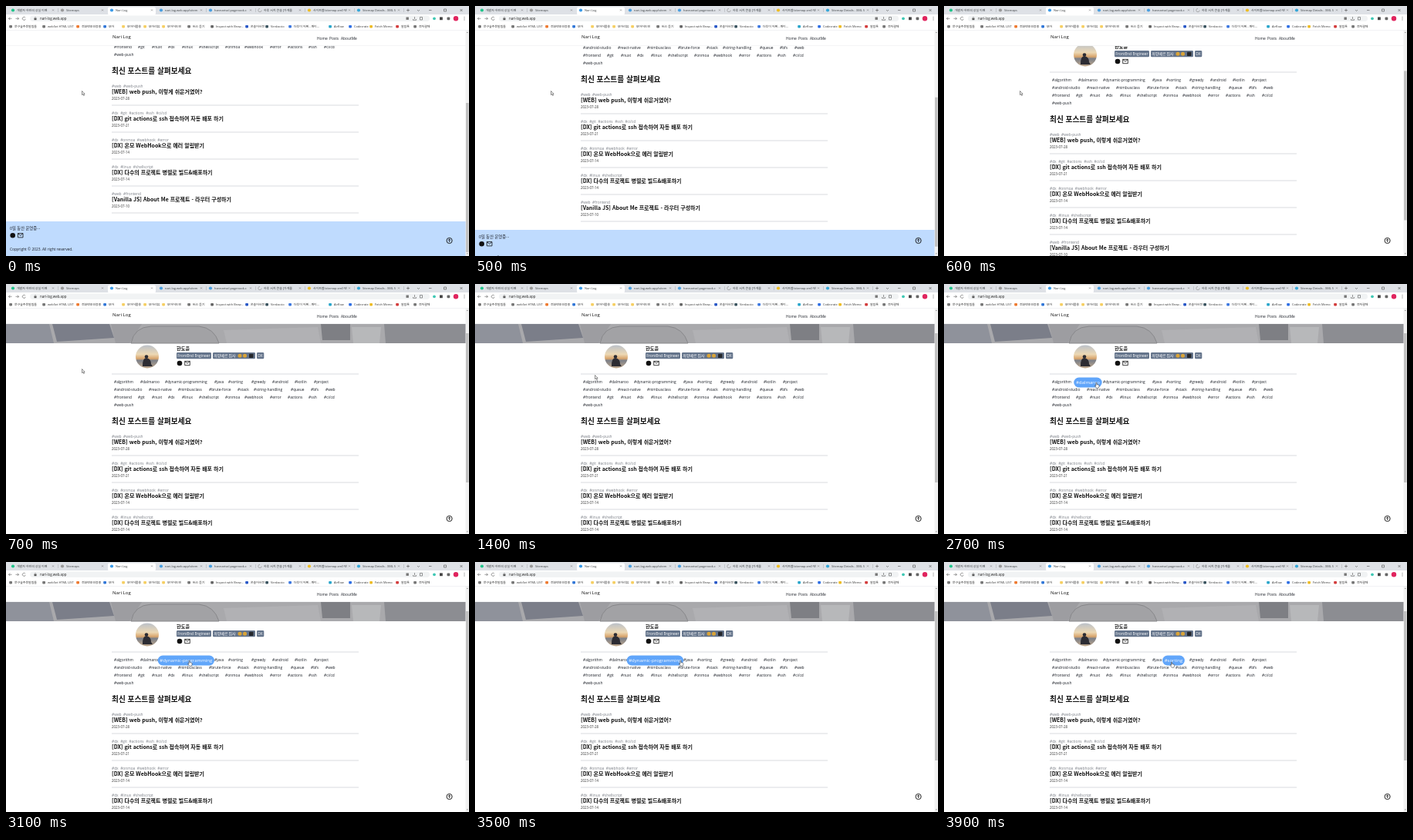
An HTML page for the animation above (4000 ms loop, 600 by 325 pixels).

```html
<!DOCTYPE html>
<html lang="ko">
<head>
<meta charset="utf-8">
<title>Nari Log</title>
<style>
html, body { margin: 0; width: 600px; height: 325px; overflow: hidden; background: #fff; }
svg { display: block; }
text { font-family: "Open Sans", "Noto Sans CJK KR", "Noto Sans CJK", sans-serif; white-space: pre; }
.bold { font-family: "Noto Sans CJK KR", "Noto Sans CJK", sans-serif; font-weight: 700; }
</style>
</head>
<body>
<svg id="stage" width="600" height="325" viewBox="0 0 600 325"></svg>
<script>
const LOOP = 4000, SCROLL = 94;
const INK = '#1b1f27', BLUE = [96, 165, 250];

const text = (x, y, size, str, fill = INK, extra = '') =>
  `<text x="${x}" y="${y}" font-size="${size}" fill="${fill}" ${extra}>${str}</text>`;
const bold = (x, y, size, str) => text(x, y, size, str, '#111', 'class="bold"');
const rect = (x, y, w, h, fill, rx = 0) =>
  `<rect x="${x}" y="${y}" width="${w}" height="${h}" rx="${rx}" fill="${fill}"/>`;
const dot = (x, y, r, fill) => `<circle cx="${x}" cy="${y}" r="${r}" fill="${fill}"/>`;
const line = (d, stroke = '#555', width = .6) =>
  `<path d="${d}" fill="none" stroke="${stroke}" stroke-width="${width}"/>`;
const poly = (points, fill) => `<polygon points="${points}" fill="${fill}"/>`;
const rule = y => rect(137, y - .4, 320, .8, '#cfd2d8');
const mail = (x, y) => line(`M${x - 3.3} ${y - 2.6}h6.6v5.3h-6.6zl3.3 2.8l3.3-2.8`, '#111', .8);

// Browser window
const tabs = [
  ['#22c58b', '개발자 하린의 성실 이벤'], ['#999', 'Sitemaps'], ['#3b9be8', 'Nari Log'],
  ['#4a9fe0', 'nari-log.web.app/sitem'], ['#4a9fe0', 'hannarisol.pagenook.c'],
  ['#888', '하루 서치 콘솔 [가게를'], ['#eebd22', '사이트맵(sitemap.xml) 만'],
  ['#35a7d8', 'Sitemap Details - XML S']
];
const FOLDER = '#f6cf63';
const bookmarks = [
  [6, '#777', '문구숲주문알림들'], [49, '#777', 'webSet HTML LIST'], [93, '#ee7a30', '전화번호인증중'],
  [128, '#3177d8', '모아'], [152, FOLDER, '모아어플용'], [180, FOLDER, '모아리뷰'],
  [204, FOLDER, '모아어드민'], [237, '#777', '버스 듣기'], [267, '#666', 'Inspect with Brow...'],
  [312, '#2857c7', '온솔어사전'], [338, '#3c5560', 'Verdaccio'], [368, '#3d78e0', '더욱이 어쩌 - 깨이...'],
  [420, '#2ba6cb', 'Airflow'], [446, '#2f6fe4', 'Codecrate'], [473, '#eebc26', 'Fetch Memo'],
  [507, '#d33c3c', '알림톡'], [530, '#777', '전자결재']
];

function browser() {
  let s = rect(0, 0, 600, 11, '#dee1e6') + rect(0, 11, 600, 20.5, '#fff') + rect(132, 1.5, 62, 10, '#fff', 2);
  tabs.forEach(([color, label], i) => {
    const x = 9 + i * 64;
    s += i == 5 ? line(`M${x} 3.3a2.2 2.2 0 1 0 2.2 2.2`, color) : dot(x, 5.5, 2.1, color);
    s += text(x + 5, 7, 3.95, label, '#3c4043') + line(`M${x + 51} 4.4l2 2m0-2l-2 2`, '#555', .4);
    if (i != 1 && i != 2) s += rect(x + 58, 3, .4, 5, '#9a9da2');
  });
  s += line('M519 5.5h4m-2-2v4M533 5l1.5 1.5l1.5-1.5M548 5.5h3.5M567.5 4h3v3h-3zM588.5 4l3 3m0-3l-3 3', '#333', .5);
  s += rect(31, 12.5, 518, 7.6, '#f1f3f4', 3.8) + text(44, 17.8, 4.4, 'nari-log.web.app', '#222');
  s += line('M7.5 16.3h-4m1.7-1.7l-1.7 1.7l1.7 1.7M12.5 16.3h4m-1.7-1.7l1.7 1.7l-1.7 1.7M25 15.2a2 2 0 1 0 .3 1.7');
  s += rect(36.5, 15.8, 3, 2.4, '#555') + line('M37 16v-1q1-1.4 2 0v1', '#555', .4);
  s += rect(518.5, 14.5, 3.4, 3.4, '#777') + line('M527.5 17v1.3h4v-1.3M529.5 14v3.2M536.5 14.5h3v3.5h-3z');
  s += dot(555, 16.3, 1.9, '#3fc8b4') + rect(562, 14.4, 3.8, 3.8, '#444') +
    rect(571.5, 14.4, 3.8, 3.8, '#666', 1) + dot(583, 16.3, 3.2, '#e0245e');
  s += [14.5, 16.3, 18.1].map(y => dot(594, y, .5, '#555')).join('');
  for (const [x, color, label] of bookmarks)
    s += rect(x - 1.8, 25, 3.8, 3.4, color, .8) + text(x + 5, 28.3, 3.95, label, '#333');
  return s + rect(0, 31, 600, .5, '#e2e4e8');
}

function siteHeader() {
  return rect(0, 31, 596, 21, '#fff') + rect(0, 51.5, 596, .5, '#e8eaed') +
    text(138, 42.2, 6.1, 'Nari Log', '#111') +
    text(403, 43.5, 4.85, 'Home') + text(419, 43.5, 4.85, 'Posts') + text(434, 43.5, 4.85, 'AboutMe');
}

// Scrolling page
function hero() {
  return rect(0, 52, 596, 25, '#a9a9ac') +
    poly('0,52 56,52 62,77 0,77', '#8f929b') + poly('60,52 134,52 140,70 66,75', '#7b7e89') +
    poly('136,52 176,52 160,77 142,77', '#9d9da1') +
    `<path d="M162 77q4-21 26-22h62q20 2 26 22z" fill="#a2a2a5" stroke="#88888b"/>` +
    poly('282,60 404,56 408,77 286,77', '#b1b1b4') + poly('408,52 446,52 446,73 410,73', '#7e7f84') +
    poly('448,56 486,56 484,77 450,77', '#b7b8ba') + poly('490,52 596,52 596,77 492,77', '#8c8d92');
}

function profile() {
  const badge = (x, w, label) => rect(x, 89, w, 8.3, '#64748b', 1.4) + text(x + 1.3, 94.9, 4.9, label, '#fff');
  return `<defs><linearGradient id="dusk" x2="0" y2="1">
      <stop offset="0" stop-color="#b9c0ca"/><stop offset=".4" stop-color="#ecd8b4"/>
      <stop offset=".58" stop-color="#d9a56c"/><stop offset=".66" stop-color="#7c8088"/>
      <stop offset="1" stop-color="#c3a98b"/></linearGradient>
      <clipPath id="round"><circle cx="183" cy="94.5" r="15"/></clipPath></defs>
    <g clip-path="url(#round)">${rect(168, 79, 30, 31, 'url(#dusk)')}${dot(182, 94.5, 2.3, '#2c2c33')}
      <path d="M177 106q0-10 5-10q6 1 6 8l2 3h-13z" fill="#2c2c33"/></g>` +
    bold(221, 86.3, 6.2, '한도윤') +
    badge(221, 45, 'FrontEnd Engineer') + badge(268, 55, '까망베르 집사') + badge(325, 9.3, 'DX') +
    dot(303, 93.3, 2.5, '#d9a336') + dot(309.5, 93.3, 2.5, '#d9a336') + rect(315, 90.7, 5.5, 5.2, '#24262b', .6) +
    dot(225, 103, 3.3, '#111') + mail(235, 103);
}

const tagRows = [
  '140 algorithm,174 dalmaroo,206 dynamic-programming,270 java,288 sorting,318 greedy,345 android,374 kotlin,399 project',
  '140 android-studio,185 react-native,223 nimbusclass,263 brute-force,300 stack,321 string-handling,369 queue,395 bfs,414 web',
  '140 frontend,171 git,189 nuxt,210 dx,228 linux,250 shellscript,284 onmoa,309 webhook,342 error,365 actions,392 ssh,412 ci/cd',
  '140 web-push'
];
const tagList = () => tagRows.map((row, r) => row.split(',').map(tag => {
  const [x, label] = tag.split(' ');
  return `<g class="tag">${text(x, 129.3 + r * 10, 4.85, '#' + label)}</g>`;
}).join('')).join('');

const posts = [
  ['#web  #web-push', '[WEB] web push, 이렇게 쉬운거였어?', '2023-07-28'],
  ['#dx  #git  #actions  #ssh  #ci/cd', '[DX] git actions로 ssh 접속하여 자동 배포 하기', '2023-07-21'],
  ['#dx  #onmoa  #webhook  #error', '[DX] 온모 WebHook으로 에러 알림받기', '2023-07-14'],
  ['#dx  #linux  #shellscript', '[DX] 다수의 프로젝트 병렬로 빌드&amp;배포하기', '2023-07-14'],
  ['#web  #frontend', '[Vanilla JS] About Me 프로젝트 - 라우터 구성하기', '2023-07-10']
];
const postList = () => posts.map(([labels, title, date], i) => {
  const y = 198 + i * 35;
  return text(137, y + 1.5, 4.85, labels, '#7b7f87') + bold(137, y + 10.2, 7, title) +
    text(137, y + 17.7, 4.4, date, '#333') + rule(y + 25);
}).join('');

const footer = () => rect(0, 374, 596, 45, '#bfdbfe') + text(5, 384.6, 5.3, '0일 동안 운영중···') +
  dot(8.7, 392.2, 3.3, '#111') + mail(18.7, 392.2) + text(5, 411.7, 4.85, 'Copyright © 2023. All right reserved.');

const stage = document.getElementById('stage');
stage.innerHTML = rect(0, 0, 600, 325, '#fff') +
  `<g id="page">${hero()}${profile()}${rule(117)}${postList()}${footer()}
    ${bold(137, 181.8, 9.7, '최신 포스트를 살펴보세요')}${tagList()}</g>` +
  siteHeader() + rect(595.5, 31.5, 4.5, 294, '#f1f1f1') +
  poly('596.8,35 598.8,35 597.8,33.8', '#777') + poly('596.8,321.5 598.8,321.5 597.8,322.7', '#777') +
  `<g id="thumb">${rect(596, 64, 3.6, 194, '#c1c1c1')}</g>` +
  `<circle cx="574.6" cy="305" r="3.6" fill="none" stroke="#111" stroke-width=".9"/>` +
  line('M574.6 307v-4m-1.7 1.7l1.7-1.7l1.7 1.7', '#111', .8) + browser() +
  `<g id="cursor" fill="#fff" stroke="#222" stroke-width=".5" stroke-linejoin="round">
    <path id="arrow" d="M0 0v5l1.2-1l.9 2l.9-.4l-.9-1.9h1.5z"/>
    <path id="hand" d="M0 .3q.9-.7 1.1.3v2l2.4.6q.9.4.6 1.6l-.6 2.4h-2.8l-2.3-3q.3-.9 1.6.2z"/></g>`;

const $ = id => document.getElementById(id);

// Tags along the cursor's way, each with the times it is entered and left
const hovers = [[1500, 2330], [2330, 2840], [2840, 3530], [3530, 3640], [3640, 9999]].map(([enter, leave], i) => {
  const group = document.querySelectorAll('.tag')[i], label = group.firstChild;
  const x = +label.getAttribute('x'), width = label.getComputedTextLength();
  group.insertAdjacentHTML('afterbegin', rect(x - 2.1, 122.8, width + 4.2, 10.4, `rgb(${BLUE})`, 5.2));
  return { group, label, pill: group.firstChild, cx: x + width / 2, enter, leave };
});

const path = [
  [0, 98.5, 110.5], [1150, 98.5, 110.5], [1400, 155.5, 118.5], [1600, 158, 127], [2200, 171.5, 128],
  [2840, 204, 128], [3100, 237, 128], [3530, 268, 128], [3640, 286, 129], [3900, 294.5, 130], [4000, 295, 130]
];

function smooth(t, start, duration) {
  const u = Math.min(1, Math.max(0, (t - start) / duration));
  return u * u * (3 - 2 * u);
}

function cursorAt(t) {
  const i = path.findIndex(p => p[0] > t), [t0, x0, y0] = path[i - 1], [t1, x1, y1] = path[i];
  const u = (t - t0) / (t1 - t0);
  return [x0 + (x1 - x0) * u, y0 + (y1 - y0) * u];
}

function draw(t) {
  const offset = Math.round(SCROLL * (1 - smooth(t, 446, 252)));
  $('page').setAttribute('transform', `translate(0 ${-offset})`);
  $('thumb').setAttribute('transform', `translate(0 ${offset * 62 / SCROLL})`);

  for (const { group, label, pill, cx, enter, leave } of hovers) {
    const level = Math.max(0, smooth(t, enter, 280) - smooth(t, leave, 280));
    group.setAttribute('transform', `translate(${cx} 128) scale(${1 + level / 4}) translate(${-cx} -128)`);
    pill.setAttribute('opacity', level);
    label.setAttribute('fill', `rgb(${[27, 31, 39].map(c => c + (255 - c) * level)})`);
  }

  const pointing = t >= 1500;
  $('cursor').setAttribute('transform', `translate(${cursorAt(t)})`);
  $('arrow').style.display = pointing ? 'none' : '';
  $('hand').style.display = pointing ? '' : 'none';
}

const begin = performance.now();
function tick() {
  draw((performance.now() - begin) % LOOP);
  requestAnimationFrame(tick);
}
tick();
</script>
</body>
</html>
```
